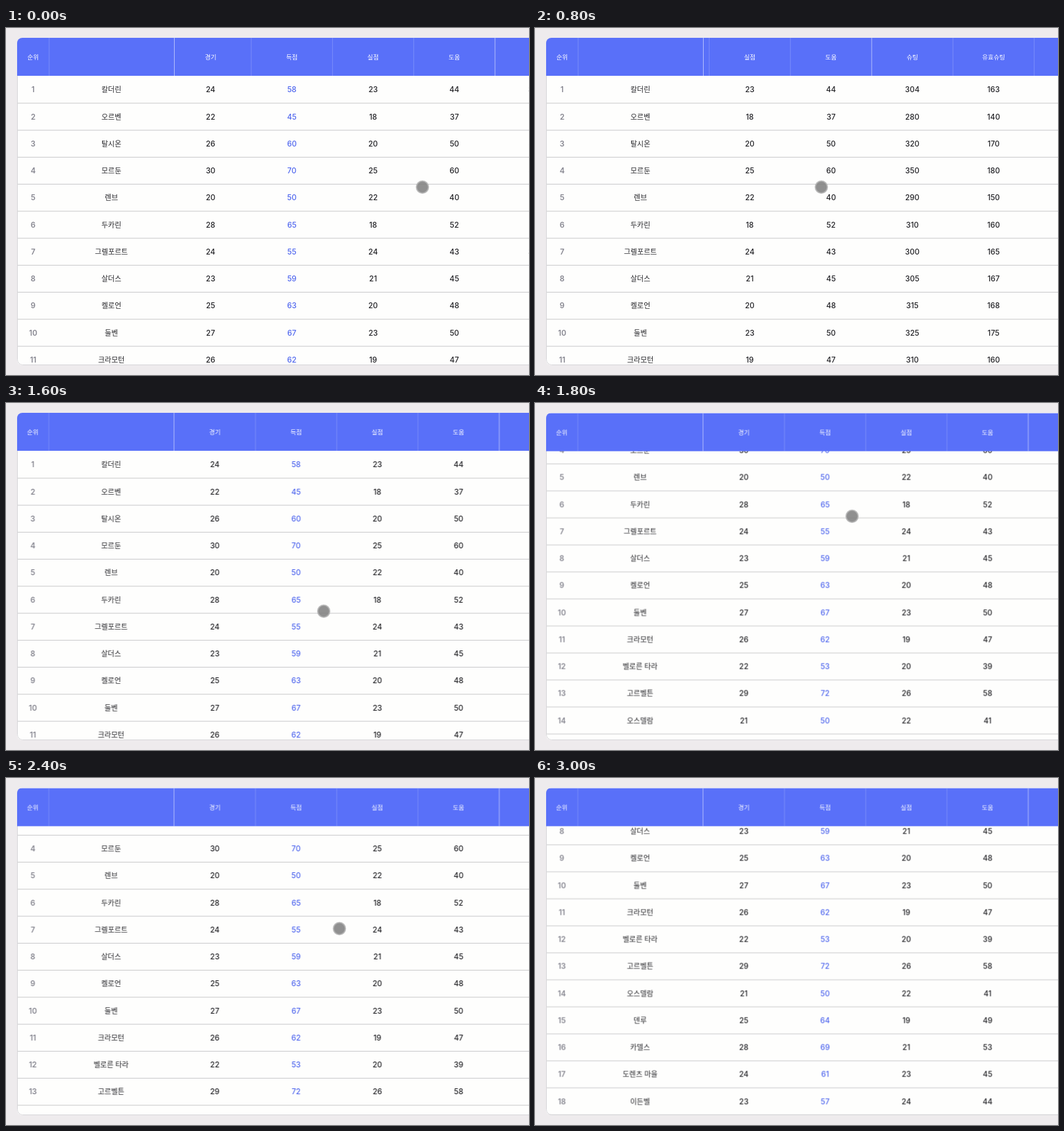
An HTML page for the animation above (3200 ms loop, 800x530 px).

```html
<!DOCTYPE html>
<html lang="ko">
<head>
<meta charset="utf-8">
<title>순위표</title>
<style>
  html, body { margin: 0; width: 100%; height: 100%; overflow: hidden; background: #eeebed; }
  svg { display: block; width: 800px; height: 530px; }
  text { text-anchor: middle; font-family: Inter, "Noto Sans CJK KR", "Noto Sans CJK", sans-serif; }
  .num { font-size: 11.5px; font-weight: 500; fill: #222226; }
  .goal { fill: #4f66ee; }
  .rank { font-size: 11.5px; font-weight: 600; fill: #85858f; }
  .name { font-size: 11px; font-weight: 500; fill: #26262a; }
  .head { font-size: 9.5px; font-weight: 500; fill: #fff; }
  .line { stroke: #c7c7c9; }
  .faint { stroke: #fff; stroke-opacity: .2; }
  .bold { stroke: #fff; stroke-opacity: .55; }
</style>
</head>
<body>
<svg viewBox="0 0 800 530">
  <defs>
    <clipPath id="card"><rect x="17" y="15" width="800" height="500" rx="8"/></clipPath>
    <clipPath id="cols"><rect x="257" y="0" width="560" height="900"/></clipPath>
  </defs>
  <g clip-path="url(#card)">
    <rect x="17" y="15" width="800" height="500" fill="#fefefd"/>
    <g id="body">
      <g id="lines"></g>
      <g id="fixed"></g>
      <g clip-path="url(#cols)"><g id="cells"></g></g>
    </g>
    <rect x="17.5" y="14" width="800" height="500.5" rx="8" fill="none" stroke="#d6d5d8"/>
    <g id="top">
      <rect x="17" y="15" width="800" height="58" fill="#5970f9"/>
      <g id="headFixed"></g>
      <g clip-path="url(#cols)"><g id="headCols"></g></g>
    </g>
  </g>
  <circle id="touch" r="9.2" fill="#808080" fill-opacity=".87" stroke="#b4b4b4" stroke-opacity=".85" stroke-width="2"/>
</svg>
<script>
const ROW = 41.25, COL = 124.3, TOP = 73.6, LEFT = 257.3;
const STEP = 200;
const heads = ['경기', '득점', '실점', '도움', '슈팅', '유효슈팅'];
const teams = [
  '칼더린|24 58 23 44 304 163',
  '오르벤|22 45 18 37 280 140',
  '탈시온|26 60 20 50 320 170',
  '모르둔|30 70 25 60 350 180',
  '렌브|20 50 22 40 290 150',
  '두카린|28 65 18 52 310 160',
  '그렐포르트|24 55 24 43 300 165',
  '살더스|23 59 21 45 305 167',
  '켈로언|25 63 20 48 315 168',
  '둘벤|27 67 23 50 325 175',
  '크라모턴|26 62 19 47 310 160',
  '벨로른 타라|22 53 20 39',
  '고르벨튼|29 72 26 58',
  '오스델람|21 50 22 41',
  '덴루|25 64 19 49',
  '카델스|28 69 21 53',
  '도렌츠 마을|24 61 23 45',
  '이든벨|23 57 24 44'
];
// scroll x, scroll y, touch x, touch y (no touch when left out)
const poses = [
  [6.5, 0, 637, 243], [20, 0, 623, 243], [80, 0, 563, 243], [162, 0, 482, 243],
  [239.5, 0, 438, 243], [165, 0, 512, 243], [0, 0, 653, 241], [0, 0, 575, 275],
  [0, 0, 486, 318], [0, 145.6, 485, 173], [0, 246.8, 490, 94], [0, 246.8, 491, 94],
  [0, 110, 510, 230], [0, 0, 528, 368], [0, 165, 512, 205], [0, 301.6]
];

const $ = id => document.getElementById(id);

function add(parent, tag, attrs, label) {
  const el = document.createElementNS('http://www.w3.org/2000/svg', tag);
  for (const key in attrs) el.setAttribute(key, attrs[key]);
  if (label !== undefined) el.textContent = label;
  $(parent).append(el);
}
const text = (parent, cls, x, y, label) => add(parent, 'text', { class: cls, x, y }, label);
const line = (parent, cls, x1, y1, x2, y2) => add(parent, 'line', { class: cls, x1, y1, x2, y2 });
const colX = i => LEFT + COL * (i + .5);

teams.forEach((team, i) => {
  const [name, stats] = team.split('|');
  const mid = TOP + ROW * (i + .5);
  const end = TOP + ROW * (i + 1);
  line('lines', 'line', 17, end, 800, end);
  text('fixed', 'rank', 41, mid + 4.2, i + 1);
  text('fixed', 'name', 160.7, mid + 4.1, name);
  stats.split(' ').forEach((n, c) => text('cells', c === 1 ? 'num goal' : 'num', colX(c), mid + 4.2, n));
});

text('headFixed', 'head', 41, 48, '순위');
line('headFixed', 'faint', 65.5, 15, 65.5, 73);
line('headFixed', 'bold', 257, 15, 257, 73);
heads.forEach((label, i) => {
  const x = LEFT + COL * (i + 1);
  text('headCols', 'head', colX(i), 48, label);
  line('headCols', i === 3 ? 'bold' : 'faint', x, 15, x, 73);
});

function play(id, frame) {
  const keys = poses.map((p, i) => ({ ...frame(p), offset: i / poses.length, easing: 'step-end' }));
  keys.push({ ...frame(poses[poses.length - 1]), offset: 1 });
  $(id).animate(keys, { duration: STEP * poses.length, iterations: Infinity });
}
const move = (x, y) => ({ transform: `translate(${x}px, ${y}px)` });
const nudge = ([sx]) => move(sx ? .5 : 0, 0);

play('body', ([, sy]) => move(0, -sy));
play('cells', ([sx]) => move(-sx, 0));
play('headCols', ([sx]) => move(-sx, 0));
play('fixed', nudge);
play('headFixed', nudge);
play('top', ([, sy]) => move(0, sy ? .6 : 0));
play('touch', ([, , x, y]) => ({ ...move(x || 0, y || 0), opacity: x ? 1 : 0 }));
</script>
</body>
</html>
```
